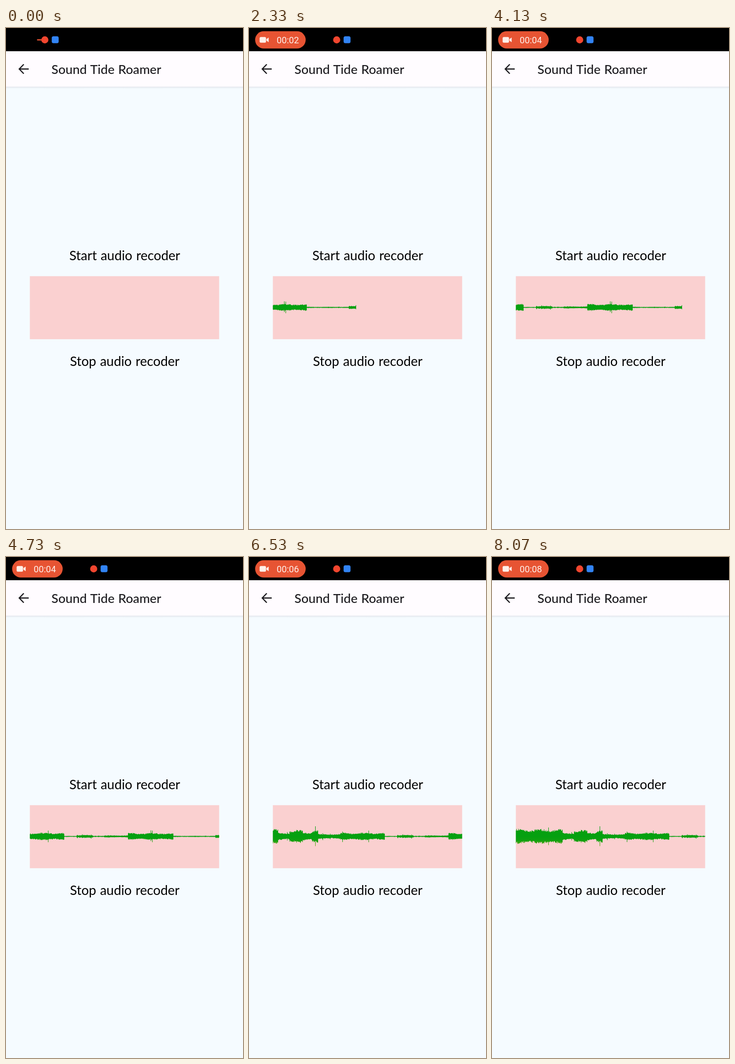
Write an HTML page that moves like this. It is 480x1014 px and loops after 8.27 s.

```html
<!DOCTYPE html>
<html lang="en">
<head>
<meta charset="utf-8">
<style>
  html, body { margin: 0; width: 100%; height: 100%; overflow: hidden; background: #f5fbff; }
  svg { display: block; width: 480px; height: 1014px; }
  text { font-family: Lato, sans-serif; font-size: 26.5px; word-spacing: 1px; }
  #title { font-size: 25.7px; font-weight: 500; }
  #time { font: 18.2px Roboto, sans-serif; fill: #fff0ea; }
</style>
</head>
<body>
<svg viewBox="0 0 480 1014">
  <defs>
    <linearGradient id="level" gradientUnits="userSpaceOnUse" x1="0" y1="566" x2="0" y2="629">
      <stop offset="0" stop-color="#05a010"/>
      <stop offset=".12" stop-color="#0fa010"/>
      <stop offset=".5" stop-color="#d8b820"/>
      <stop offset="1" stop-color="#f04020"/>
    </linearGradient>
    <linearGradient id="shade" x2="0" y2="1">
      <stop stop-color="#dfe2e9"/>
      <stop offset="1" stop-color="#f5fbff"/>
    </linearGradient>
    <clipPath id="box"><rect x="48.3" y="502.3" width="383.4" height="127.6"/></clipPath>
  </defs>

  <rect width="480" height="1014" fill="#f5fbff"/>
  <rect y="118" width="480" height="5" fill="url(#shade)"/>
  <rect y="46" width="480" height="72.7" fill="#fffcff"/>
  <rect width="480" height="47"/>

  <rect id="pill" fill="#e75433"/>
  <g id="clock" fill="#fff0ea">
    <rect x="21.5" y="18.3" width="13" height="11.4" rx="2.5"/>
    <path d="M35.3 22.5L39.8 19.3V28.7L35.3 25.5Z"/>
    <text id="time" x="56" y="30.7"></text>
  </g>
  <g id="icons">
    <circle cx="78" cy="24" r="7.2" fill="#f2462f"/>
    <rect x="92" y="16.8" width="14" height="14" rx="3.5" fill="#3284f5"/>
  </g>

  <path d="M46 83H27.5M36 73.5L26.8 83L36 92.5" fill="none" stroke="#1c1b1f" stroke-width="2.4"/>
  <text id="title" x="92" y="93" fill="#1c1b1f">Sound Tide Roamer</text>

  <text id="start" x="240.5" y="470" text-anchor="middle">Start audio recoder</text>
  <rect x="48.3" y="502.3" width="383.4" height="127.6" fill="#fad0d0"/>
  <g clip-path="url(#box)">
    <path id="wave" stroke="url(#level)" stroke-width="1.05"/>
  </g>
  <text id="stop" x="240.5" y="683.5" text-anchor="middle">Stop audio recoder</text>

  <g id="touch">
    <circle r="15.3" fill="#8ea4d8" opacity=".25"/>
    <circle r="13.8" fill="#fff" fill-opacity=".82" stroke="#b9c3dc" stroke-width="1.2"/>
  </g>
</svg>
<script>
const LOOP = 8270, MID = 565.5, SAMPLES = 631;
const el = id => document.getElementById(id);
const clamp = v => Math.min(1, Math.max(0, v));
const set = (id, attrs) => {
  for (const key in attrs) el(id).setAttribute(key, attrs[key]);
};

// Recorded pixels: uneven pace between a few times
const pace = [[580, 0], [3330, 264], [4730, 390], [6000, 493], [7360, SAMPLES]];
function recorded(t) {
  const i = pace.findIndex(p => t < p[0]);
  if (i < 0) return SAMPLES;
  if (i === 0) return 0;
  const [t0, s0] = pace[i - 1], [t1, s1] = pace[i];
  return s0 + (s1 - s0) * (t - t0) / (t1 - t0);
}

let seed = 7;
const random = () => (seed = seed * 16807 % 2147483647) / 2147483647;

// Each sound runs from its start to the next one
const sounds = [
  { from: 0, level: 3 }, { from: 15, level: 1.2 }, { from: 100, level: 7 },
  { from: 192, level: 2.2 }, { from: 240, level: 1.3 }, { from: 263, level: 3 },
  { from: 296, level: 1 }, { from: 321, level: 7.5 }, { from: 411, level: 5 },
  { from: 456, level: 13 }, { from: 469, level: 9 }, { from: 487, level: 13 },
  { from: 514, level: 7.5 }, { from: 537, level: 15 }
];

function loudness(s) {
  const { level } = sounds.findLast(sound => sound.from <= s);
  const swell = .92 + .12 * Math.sin(s / 7);
  const knock = random() < .02 ? 1.7 : 1;
  return level * swell * knock;
}

// One bar per pixel, newest sound at the far left
let bars = '';
for (let s = 0; s <= SAMPLES; s++) {
  const loud = loudness(s);
  const half = () => Math.max(.8, loud * (.7 + .3 * random()));
  const up = half(), down = half();
  bars += `M${48.5 - s} ${(MID - up).toFixed(1)}v${(up + down).toFixed(1)}`;
}
el('wave').setAttribute('d', bars);

// A label dims while a finger is down and returns after release
const dim = (t, down, up) => 1 - .8 * clamp((t - down) / 100) * clamp(1 - (t - up) / 230);

function draw(t) {
  const grow = 1 - (1 - clamp(t / 450)) ** 3;
  const left = 63 - 50.6 * grow, right = 73 + 41.8 * grow, height = 2.5 + 32.5 * grow;
  set('pill', { x: left, y: 24 - height / 2, width: right - left, height, rx: height / 2 });
  set('clock', { opacity: clamp((t - 180) / 200) });
  set('icons', { transform: `translate(${99.6 * grow})` });
  el('time').textContent = '00:0' + Math.max(0, Math.floor((t - 65) / 1000));

  const shown = Math.round(recorded(t));
  set('wave', { transform: `translate(${shown})`, opacity: shown ? 1 : 0 });
  set('start', { opacity: dim(t, 330, 520) });
  set('stop', { opacity: dim(t, 6990, 7210) });

  const first = t > 300 && t < 520, second = t > 6960 && t < 7210;
  set('touch', {
    transform: `translate(267 ${first ? 466 : 681})`,
    opacity: first || second ? 1 : 0
  });
}

const begin = performance.now();
function frame() {
  draw((performance.now() - begin) % LOOP);
  requestAnimationFrame(frame);
}
frame();
</script>
</body>
</html>
```
